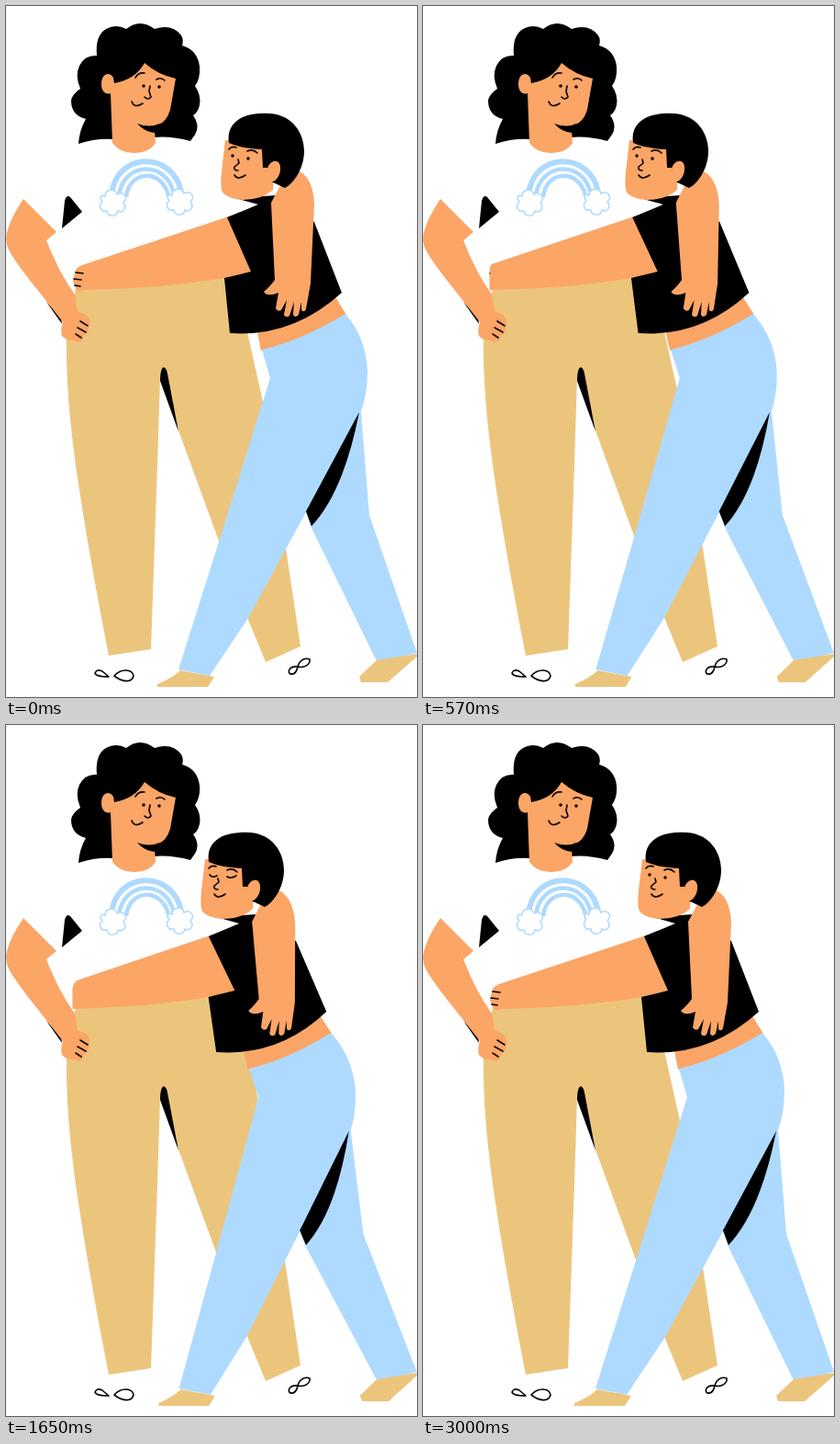
Recreate the animation shown at these times as an HTML page. Size 448 by 752 pixels, loop 3600 ms.

```html
<!DOCTYPE html>
<html lang="en">
<head>
<meta charset="utf-8">
<title>Hug</title>
<style>
  html, body { margin: 0; width: 100%; height: 100%; overflow: hidden; background: #fff; }
  svg { display: block; width: 100%; height: 100%; }
  .skin { fill: #fba566; }
  .tan { fill: #ecc57d; }
  .blue { fill: #aedaff; }
  .line { fill: none; stroke: #000; stroke-width: 1.6; stroke-linecap: round; stroke-linejoin: round; }
  .arc { fill: none; stroke: #aedaff; }
  .cloud { fill: #fff; stroke: #aedaff; stroke-width: 1.6; }
  .heart { fill: #f9565d; }
</style>
</head>
<body>
<svg viewBox="0 0 448 752">
  <defs>
    <clipPath id="waist"><path d="M460 200H100L81 276Q73 279 72.5 287V312H460Z"/></clipPath>
    <path id="heart" d="M0 .5C-.3 .25-.5 .05-.5-.18C-.5-.5-.1-.55 0-.24C.1-.55 .5-.5 .5-.18C.5 .05 .3 .25 0 .5Z"/>
    <path id="cloud" d="M-9-7C-9-15 2-16 4-9C11-13 17-5 11 0C16 6 10 12 5 9C4 16-6 16-7 9C-14 11-17 3-12-1C-16-6-13-9-9-7Z"/>
  </defs>

  <!-- tall figure: legs and shoes -->
  <path class="tan" d="M76 306L66 362Q65 420 76 500Q89 590 112 707L158 700L165 500L168 404Q172 392 176 404L188 462L232 582L264 668L283 714L321 697L305 590L281 435L262 350L240 290Z"/>
  <path d="M168 408C168 390 174 390 176 400L188 463Z"/>
  <g class="line">
    <path d="M112 730Q98 730 97 726Q99 721 105 724ZM118 729C126 720 138 722 139 729C137 737 127 736 118 729Z"/>
    <path d="M318 719C308 718 307 725 310 727C315 728 317 724 318 719C320 711 327 709 331 711C332 716 326 721 318 719Z"/>
  </g>

  <!-- tall figure: bent arm -->
  <path d="M44 322L61 346L60 338Z"/>
  <path class="skin" d="M19 210L55 246L44 255Q57 289 75 314L78 332L87 336Q92 340 91 347L90 353Q89 358 85 358L84 363Q80 368 74 364Q65 364 61 359Q59 352 62 344L36 311Q14 284 5 269Q-3 256 2 243Q6 229 19 210Z"/>
  <path class="line" d="M81 343L89 348M78 350L87 355M76 357L82 361"/>
  <path d="M61 242L64 212Q66 205 70 208L83 224Z"/>

  <!-- tall figure: head -->
  <path d="M79 150Q80 135 87 123Q71 119 71 103Q72 96 81 90Q75 76 80 65Q86 53 99 54Q97 32 109 25Q120 19 131 25Q146 13 162 25Q181 19 191 32Q194 37 192 43Q209 48 211 66Q212 79 206 87Q213 97 211 108Q209 116 204 119Q212 130 206 140L201 147Q180 141 160 143L116 145Q97 144 79 150Z"/>
  <path class="skin" d="M117 78C113 71 104 73 104 85C104 93 109 97 114 95L116 149Q124 160 139 160Q156 160 163 149L162 135L166 129Q175 126 179 113L185 79Q166 75 151 62Q141 80 118 84Z"/>
  <path d="M143 128Q157 133 167 128L162 138Q151 137 143 128Z"/>
  <path class="line" d="M141 78Q144 72 151 73M164 80Q169 77 173 81M157 87L156 93L158 99Q155 103 151 99M137 104Q140 112 149 106"/>
  <circle cx="150" cy="87" r="1.8"/><circle cx="167" cy="88" r="1.8"/>

  <!-- shirt print -->
  <g class="arc">
    <path stroke-width="6" d="M115 206C119 158 183 157 191 203"/>
    <path stroke-width="4.5" d="M123 207C127 169 176 167 183 205"/>
    <path stroke-width="4.5" d="M131 208C134 178 170 177 177 206"/>
  </g>
  <use href="#cloud" class="cloud" x="117" y="214"/>
  <use href="#cloud" class="cloud" x="190" y="213"/>

  <!-- short figure: reaching arm -->
  <g clip-path="url(#waist)">
    <g class="sway">
      <path class="skin" d="M246 228L86 281Q75 284 75 291L73 299Q74 304 76 307Q78 312 86 309Q173 307 238 296L270 289Z"/>
      <path class="line" d="M76 290L84 291M74 297L82 298M75 304L81 305"/>
    </g>
  </g>

  <!-- short figure: body -->
  <g class="sway">
    <path class="skin" d="M273 350L358 315L371 336Q330 369 278 375Z"/>
    <path class="blue" d="M279 374Q322 364 370 335Q393 362 394 398Q394 422 387 441L396 554L448 704L405 715L332 566L327 551L264 666L222 729L188 722L233 580L288 405Z"/>
    <path d="M385 442L327 550L333 566Q368 529 385 442Z"/>
    <path class="tan" d="M190 723Q182 731 165 738V741H220L227 730ZM404 712L385 730L387 736H416L448 708V705Z"/>
    <path d="M241 230L275 216L250 209L295 206L336 235L366 312Q312 361 244 356L238 296L267 289Z"/>
    <path class="skin" d="M289 214L302 190L316 178Q335 185 336 216L332 302L327 330Q325 334 322 331V322L319 336Q315 340 313 336L314 322L309 337Q305 340 303 336L306 320L300 331Q296 333 294 329L297 312Q285 317 281 311Q289 304 293 298Z"/>
  </g>

  <!-- short figure: head -->
  <g id="head">
    <path class="skin" d="M239 146L235 180Q233 200 237 204Q244 210 258 211Q279 211 291 200L294 150Z"/>
    <path d="M243 149Q240 130 258 121Q270 116 288 117C313 119 325 139 325 158C325 177 313 194 304 198L289 191L285 176L280 176L279 156Q256 155 243 149Z"/>
    <path class="skin" d="M285 177C288 167 298 166 299 175C300 185 293 193 286 192Z"/>
    <path class="line" d="M243 156Q246 152 251 154M263 158Q269 155 274 160M253 167L254 171L249 175Q248 179 253 179M249 184Q253 190 261 184"/>
    <g id="open"><circle cx="247" cy="163" r="1.7"/><circle cx="264" cy="166" r="1.7"/></g>
    <path id="closed" class="line" d="M244 163Q247 167 252 164M263 165Q267 168 273 164"/>
  </g>

  <g id="hearts" class="heart"></g>
</svg>

<script>
const LOOP = 3600, LEAN = 0.042, GROUND = 710, HEAD_SHIFT = 22;
const find = id => document.getElementById(id);
const clamp = v => Math.min(1, Math.max(0, v));
const swaying = document.querySelectorAll(".sway");

// x, lowest y, highest y, size, delay
const hearts = [[276, 61, 15, 30, 0], [308, 78, 46, 43, 0.1], [259, 92, 83, 30, 0.25]].map(path => {
  const node = document.createElementNS("http://www.w3.org/2000/svg", "use");
  node.setAttribute("href", "#heart");
  find("hearts").append(node);
  return { node, path };
});

function draw(time) {
  const lean = time < 2400 ? clamp(time / 900) : 1 - clamp((time - 2400) / 600);
  const skew = LEAN * lean;
  for (const part of swaying)
    part.setAttribute("transform", `matrix(1 0 ${skew} 1 ${-GROUND * skew} 0)`);
  find("head").setAttribute("transform", `translate(${-HEAD_SHIFT * lean} 0)`);

  const asleep = lean > 0.667;
  find("open").style.display = asleep ? "none" : "";
  find("closed").style.display = asleep ? "" : "none";

  const rise = (time - 900) / 740;
  find("hearts").style.display = rise > 0 && time < 1650 ? "" : "none";
  for (const { node, path: [x, low, high, size, delay] } of hearts) {
    const p = clamp((rise - delay) / (1 - delay));
    const scale = size * clamp(p * 4);
    node.setAttribute("transform", `translate(${x} ${low + (high - low) * p}) scale(${scale})`);
  }
}

const start = performance.now();
function tick() {
  draw((performance.now() - start) % LOOP);
  requestAnimationFrame(tick);
}
tick();
</script>
</body>
</html>
```
